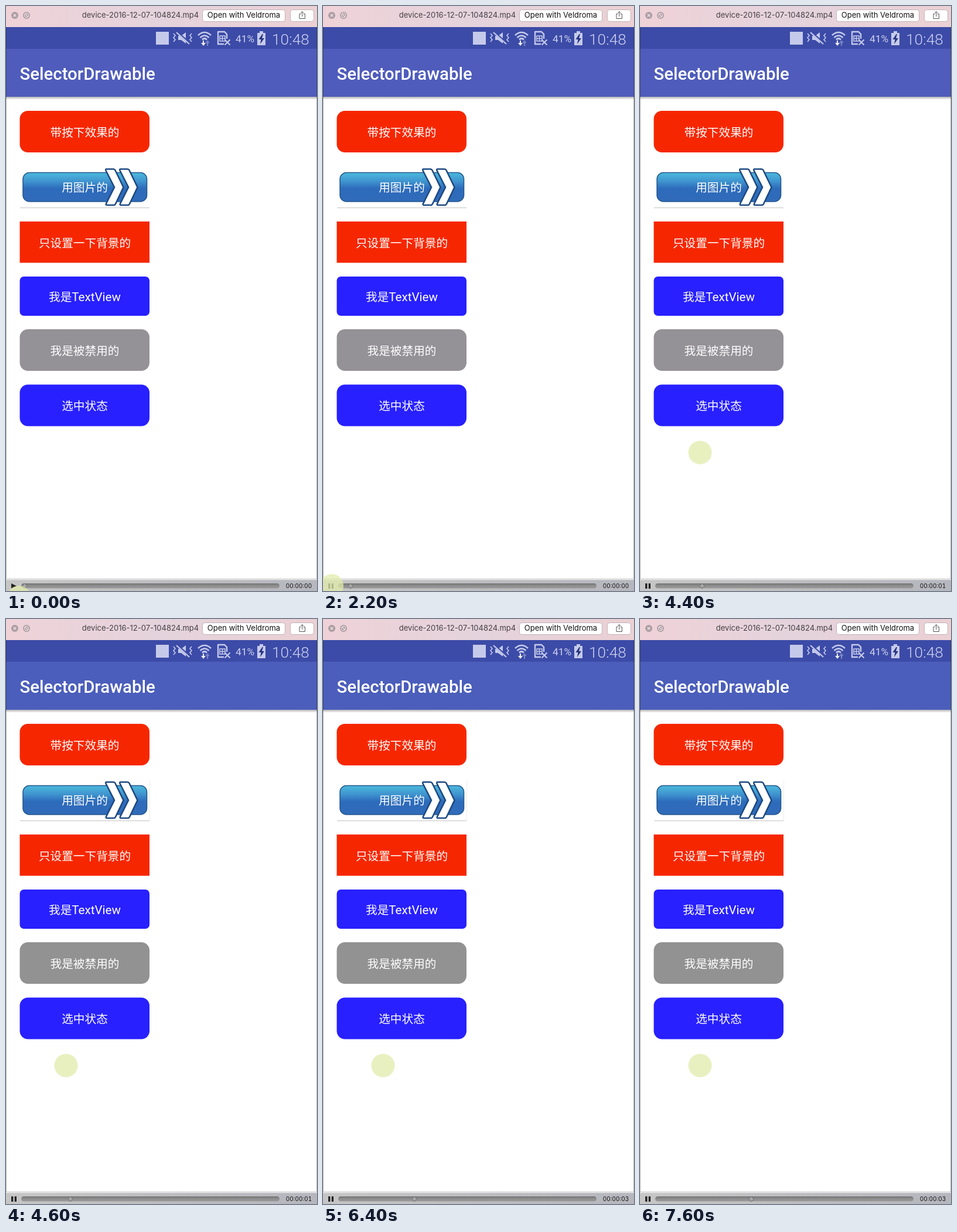
Animation, 531 px wide and 999 px high, one loop 8000 ms. Source, as an HTML page:

```html
<!DOCTYPE html>
<html lang="zh-CN">
<head>
<meta charset="utf-8">
<title>Selector demo</title>
<style>
  html, body { margin: 0; width: 100%; height: 100%; overflow: hidden; background: #fff; }
  svg { display: block; width: 531px; height: 999px; }
  .ui { font: 13px Inter, sans-serif; fill: #454045; }
  .roboto { font-family: Roboto, sans-serif; }
  .label { font: 19.65px "Noto Sans CJK SC", "Noto Sans CJK", sans-serif; fill: #fff; text-anchor: middle; }
  .label .roboto { font-size: 20.6px; }
  .icon { fill: none; stroke: #c5caea; stroke-width: 2.2; }
  .solid { fill: #c5caea; }
</style>
</head>
<body>
<svg viewBox="0 0 531 999">
  <defs>
    <linearGradient id="chrome"><stop stop-color="#efd2d8"/><stop offset=".5" stop-color="#e4d3dc"/><stop offset="1" stop-color="#ebd0d4"/></linearGradient>
    <linearGradient id="panel"><stop stop-color="#c6c6c6"/><stop offset=".5" stop-color="#bdbdc0"/><stop offset="1" stop-color="#b6b6be"/></linearGradient>
    <linearGradient id="shade" x2="0" y2="1"><stop stop-color="#000" stop-opacity=".3"/><stop offset="1" stop-color="#000" stop-opacity="0"/></linearGradient>
    <linearGradient id="groove" x2="0" y2="1"><stop stop-color="#727272"/><stop offset=".4" stop-color="#8b8b8b"/><stop offset="1" stop-color="#9b9b9b"/></linearGradient>
    <linearGradient id="glossy" x2="0" y2="1"><stop stop-color="#4cb9dc"/><stop offset=".3" stop-color="#3f94cf"/><stop offset=".55" stop-color="#2d6bbb"/><stop offset="1" stop-color="#306bb9"/></linearGradient>
    <radialGradient id="glow"><stop stop-color="#fff" stop-opacity=".48"/><stop offset=".8" stop-color="#fff" stop-opacity=".38"/><stop offset=".86" stop-color="#a66" stop-opacity=".3"/><stop offset="1" stop-color="#a66" stop-opacity="0"/></radialGradient>
    <path id="chevron" d="M171.5 278.500h12q2 0 3 2L200.500 309.500 187 338q-1 2-3 2h-12q-2 0-1-2.500L185 309.500 170.500 281q-1-2.500 1-2.500z" fill="#fff" stroke="#1d4a82" stroke-width="2.6"/>
  </defs>

  <!-- player title bar -->
  <path d="M0 0h531v36H0z" fill="url(#chrome)"/>
  <g fill="#aa9da3">
    <circle cx="15" cy="16" r="6"/><circle cx="35" cy="16" r="6"/>
    <path d="M12.700 13.700l4.600 4.600m0-4.600l-4.600 4.600M32.200 13.200l5.600 5.600" stroke="#efdce0" stroke-width="1.5"/>
    <circle cx="35" cy="16" r="3.600" fill="none" stroke="#efdce0" stroke-width="1.2"/>
  </g>
  <text class="ui" x="229.500" y="20" text-anchor="middle">device-2016-12-07-104824.mp4</text>
  <g fill="#fff" stroke="#c2b3b8"><rect x="335.500" y="6.500" width="141" height="20" rx="4"/><rect x="485.500" y="6.500" width="40" height="20" rx="4"/></g>
  <text class="ui" x="406" y="20" text-anchor="middle" style="fill:#111">Open with Veldroma</text>
  <path d="M503.500 13.500h-2.500v8h9.500v-8H508M505.800 18V9.500m-2.600 2.500l2.600-2.600 2.600 2.600" fill="none" stroke="#555"/>

  <!-- status bar and toolbar -->
  <path d="M0 36h531v37H0z" fill="#3c4ba7"/>
  <path id="toolbar" d="M0 73h531v82H0z"/>
  <path d="M0 155h531v5H0z" fill="url(#shade)"/>
  <path class="solid" d="M256 44h22v22h-22z"/>
  <g class="icon">
    <path d="M286 47l3 3.500-3 3.500 3 3.500-3 3.500M317 47l-3 3.500 3 3.500-3 3.500 3 3.500" stroke-width="1.6"/>
    <path class="solid" d="M294 51h5l8-6v19l-8-6h-5z" stroke="none"/>
    <path d="M291 44l23 20" stroke="#3c4ba7" stroke-width="4"/><path d="M291 45l22 20"/>
    <path d="M328 50q11-10 22 0M331.500 54q7.500-7 15 0M335 57.500q4-4 8 0" stroke-width="2.6"/>
    <path class="solid" d="M336 59v4h-3l4 5 4-5h-3v-4z" stroke="none" style="fill:#eef"/>
    <path d="M344 68v-8m-2.500 3l2.500-3 2.500 3" stroke="#7883c5"/>
    <path d="M362 44h11l4 4v8M372 65h-10V43" stroke-width="2.4"/>
    <path d="M365 51h9v9h-9zM365 55.500h9M369.500 51v9" stroke-width="1.5"/>
    <path d="M373.500 57.500l9 9m0-9l-9 9"/>
  </g>
  <path class="solid" d="M433 43h6v3h4v21h-14V46h4z"/>
  <path d="M437.500 48l-6 9h4l-1.500 8 7-10h-4l2-7z" fill="#283482"/>
  <g class="roboto" fill="#ced2ee">
    <text x="392" y="62" font-size="17.300">41%</text>
    <text x="454" y="66" font-size="26.300" font-weight="300">10:48</text>
    <text x="23.500" y="125.500" font-size="29.400" font-weight="500" fill="#fff">SelectorDrawable</text>
  </g>

  <!-- app buttons -->
  <rect id="pressable" x="23.500" y="179" width="221.500" height="71" rx="14"/>
  <path d="M24 344.500h221" stroke="#d3d3d3" stroke-width="1.500"/>
  <path id="sideShadow" d="M245.500 275v70" stroke="#eee"/>
  <rect x="29" y="284.500" width="211.500" height="49.500" rx="11" fill="url(#glossy)" stroke="#24588f" stroke-width="1.6"/>
  <rect id="dim" x="29" y="284.500" width="211.500" height="49.500" rx="11" fill="#123" opacity=".25"/>
  <use href="#chevron"/><use href="#chevron" x="24"/>
  <path id="lift" d="M24 439h221v4H24z" fill="url(#shade)"/>
  <path d="M23.500 368H245v70.500H23.500z" fill="#f62700"/>
  <rect x="23.500" y="462" width="221.500" height="67" rx="7" fill="#2820ff"/>
  <rect id="disabled" x="23.500" y="552" width="221.500" height="71" rx="14"/>
  <rect x="23.500" y="646.500" width="221.500" height="71" rx="14" fill="#2820ff"/>
  <g class="label">
    <text x="134.500" y="222.500">带按下效果的</text>
    <text x="134.500" y="317">用图片的</text>
    <text x="134.500" y="411.500">只设置一下背景的</text>
    <text x="134.500" y="503.500">我是<tspan class="roboto">TextView</tspan></text>
    <text x="134.500" y="595.500">我是被禁用的</text>
    <text x="134.500" y="690">选中状态</text>
  </g>
  <circle id="touch" r="19" fill="url(#glow)"/>

  <!-- player controls -->
  <path d="M.5 36v942.500h530V36" fill="none" stroke="#000" stroke-opacity=".27"/>
  <path d="M0 980h531v19H0z" fill="url(#panel)"/>
  <rect x="26" y="986" width="441" height="8.500" rx="4.250" fill="url(#groove)"/>
  <path id="thumb" d="M-4.500 0L0-4.500 4.500 0 0 4.500z" fill="#a5a5a5" stroke="#686868"/>
  <path id="play" d="M9 986l9 4.500-9 4.500z" fill="#222"/>
  <path id="pause" d="M9 986h3.300v9H9zM14.700 986H18v9h-3.300z" fill="#222"/>
  <text id="clock" class="ui" x="500" y="994" text-anchor="middle" style="font-size:10px;fill:#111;font-feature-settings:'tnum'"></text>
  <circle id="cursor" r="20" fill="#e2ebab" fill-opacity=".75"/>
</svg>
<script>
const LOOP = 8000, STEP = 200;
const PLAY_AT = 1600, REFRESH_AT = 4600;
const HELD_STEPS = new Set([7, 12, 17, 20, 28, 31, 36, 39]);

// [time, value...] keys
const thumbKeys = [[0, 32], [1400, 32], [2200, 47], [3200, 72], [4400, 106], [4800, 114], [6400, 156], [7600, 190]];
const cursorKeys = [[0, 22, 1010], [1200, 15, 990], [2400, 15, 990], [3200, 102.5, 762.5]];
// [start, end, x, y]
const taps = [[4800, 5200, 177, 221], [5400, 6000, 168, 312], [6600, 7000, 164, 402], [7400, 7600, 160, 497]];

const $ = id => document.getElementById(id);
const linear = p => p;
const smooth = p => p * p * (3 - 2 * p);
const show = (id, visible) => $(id).setAttribute('visibility', visible ? 'visible' : 'hidden');
const place = (id, x, y) => $(id).setAttribute('transform', `translate(${x} ${y})`);
const within = (t, from, to) => t >= from && t < to;

function sample(keys, t, ease) {
  const next = keys.findIndex(key => key[0] > t);
  if (next < 0) return keys[keys.length - 1].slice(1);
  const a = keys[next - 1], b = keys[next];
  const p = ease((t - a[0]) / (b[0] - a[0]));
  return a.slice(1).map((v, i) => v + (b[i + 1] - v) * p);
}

function draw(now) {
  let step = Math.floor(now % LOOP / STEP);
  if (HELD_STEPS.has(step)) step--;
  const t = step * STEP;

  const [thumbX] = sample(thumbKeys, t, linear);
  place('thumb', thumbX, 990.5);
  $('clock').textContent = '00:00:0' + Math.max(0, Math.floor((thumbX - 29.9) / 40.1));
  show('play', t < PLAY_AT);
  show('pause', t >= PLAY_AT);
  place('cursor', ...sample(cursorKeys, t, smooth));

  const tap = taps.find(([from, to]) => within(t, from, to));
  show('touch', tap);
  if (tap) place('touch', tap[2], tap[3]);
  show('dim', tap === taps[1]);
  show('lift', tap === taps[2]);

  const fresh = t >= REFRESH_AT;
  show('sideShadow', fresh);
  $('toolbar').setAttribute('fill', fresh ? '#4b5ebb' : '#4f5cbb');
  $('disabled').setAttribute('fill', fresh ? '#929292' : '#949197');
  $('pressable').setAttribute('fill', within(t, 5000, 5200) ? '#2820ff' : '#f62700');
  requestAnimationFrame(draw);
}

draw(0);
</script>
</body>
</html>
```
